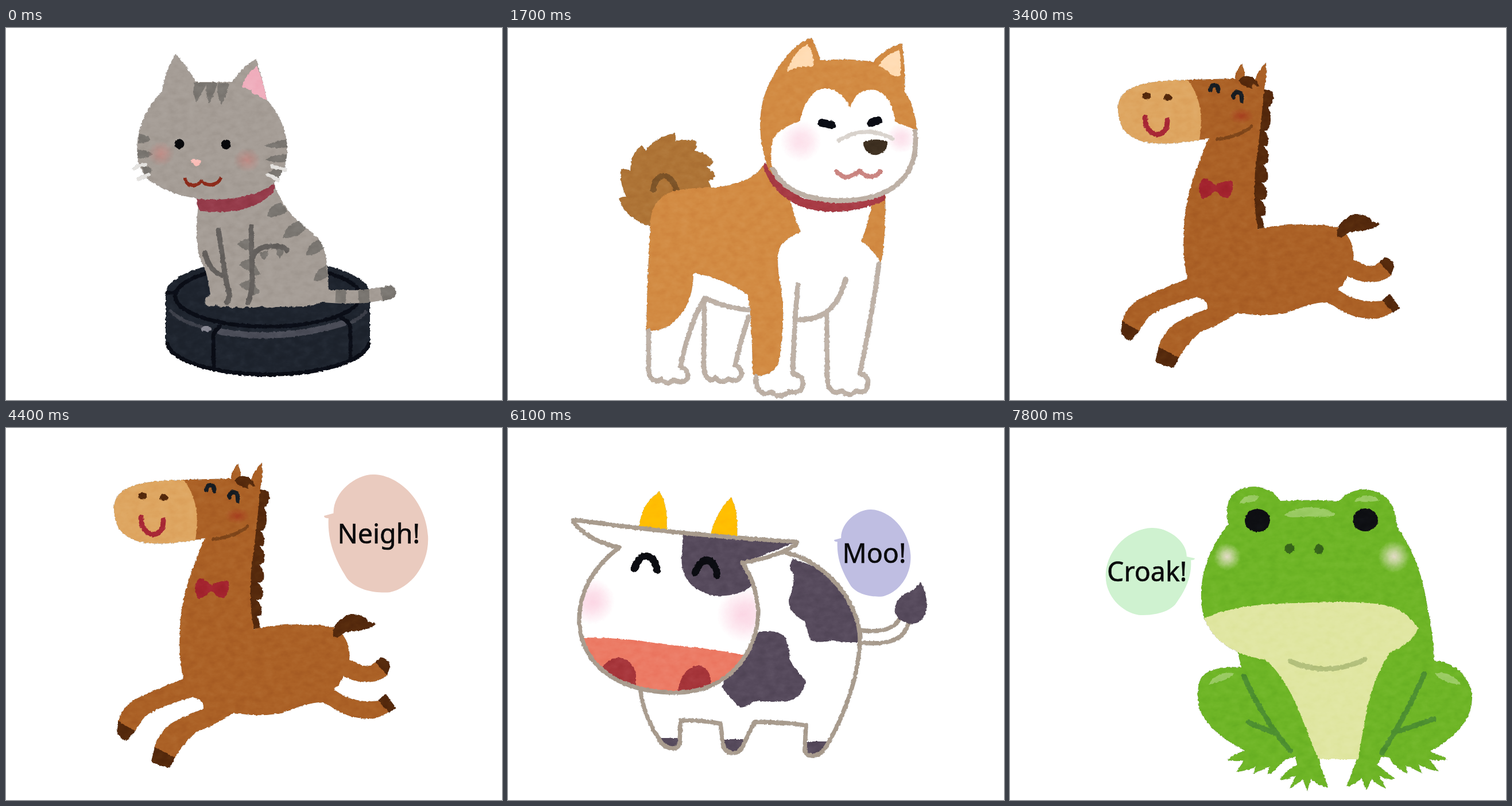
Animation of 864x648 px, one loop 8000 ms. Source, as an HTML page:

```html
<!DOCTYPE html>
<html lang="en">
<head>
<meta charset="utf-8">
<title>Animal sounds</title>
<style>
html,body{margin:0;width:100%;height:100%;overflow:hidden;background:#fff}
svg{display:block;width:100vw;height:100vh}
.art{filter:url(#paper)}
.l{fill:none;stroke-linecap:round;stroke-linejoin:round}
text{font:46.5px "Noto Sans","Open Sans",sans-serif;fill:#0a0a0c;stroke:#0a0a0c;stroke-width:.6}
</style>
</head>
<body>
<svg viewBox="0 0 864 648">
<defs>
  <filter id="paper" filterUnits="userSpaceOnUse" x="0" y="0" width="864" height="648" color-interpolation-filters="sRGB">
    <feTurbulence type="fractalNoise" baseFrequency=".2" numOctaves="2" seed="4" result="grain"/>
    <feDisplacementMap in="SourceGraphic" in2="grain" scale="4" xChannelSelector="R" yChannelSelector="G" result="rough"/>
    <feTurbulence type="fractalNoise" baseFrequency=".06 .09" numOctaves="4" seed="9"/>
    <feColorMatrix values=".16 0 0 0 .42  .16 0 0 0 .42  .16 0 0 0 .42  0 0 0 0 1" result="mottle"/>
    <feBlend in="mottle" in2="rough" mode="soft-light"/>
    <feComposite in2="rough" operator="in"/>
  </filter>
  <radialGradient id="catBlush"><stop offset="0" stop-color="#c4857f" stop-opacity=".8"/><stop offset="1" stop-color="#c4857f" stop-opacity="0"/></radialGradient>
  <radialGradient id="pink"><stop offset="0" stop-color="#fbd3e2"/><stop offset=".35" stop-color="#fbd3e2" stop-opacity=".8"/><stop offset="1" stop-color="#fbd3e2" stop-opacity="0"/></radialGradient>
  <radialGradient id="rust"><stop offset="0" stop-color="#a63a1e" stop-opacity=".85"/><stop offset="1" stop-color="#a63a1e" stop-opacity="0"/></radialGradient>
  <radialGradient id="pale"><stop offset="0" stop-color="#e3dbc6"/><stop offset=".35" stop-color="#dcdcbd" stop-opacity=".75"/><stop offset="1" stop-color="#d5dfb4" stop-opacity="0"/></radialGradient>
  <path id="bubble" d="M108 0C143-2 191 34 190 78L209 83Q209 88 200 88C203 144 178 184 163 209C143 234 103 239 78 237C38 229-2 184 1 124C5 54 58 2 108 0Z"/>
  <path id="cowHead" d="M194 208Q142 198 114 164Q110 159 122 161Q300 186 498 198Q508 199 500 204Q470 224 408 235Q432 268 436 318C436 385 390 461 290 461C200 460 130 420 124 340Q122 262 194 208Z"/>
  <clipPath id="cowClip"><use href="#cowHead"/></clipPath>
</defs>

<g class="scene">
  <g class="art">
    <path fill="#1e242e" d="M278 463A178 60 0 0 1 634 463V545A178 60 0 0 1 278 545Z"/>
    <g class="l" stroke="#3d404a" stroke-width="6">
      <path d="M287 493Q306 512 343 522M603 512Q619 504 627 494"/>
      <path stroke="#4b4d58" stroke-width="11" d="M373 529Q480 547 588 514"/>
    </g>
    <ellipse cx="349" cy="524" rx="9" ry="5" fill="#888893"/>
    <g class="l" stroke="#0a0d16" stroke-width="7">
      <ellipse cx="456" cy="467" rx="161" ry="53"/>
      <path d="M281 461H295M362 590L361 540Q361 526 373 520M600 577V522Q599 511 584 505M281 550A176 58 0 0 0 632 550"/>
    </g>
    <g class="l" stroke-width="23">
      <path stroke="#a59d96" d="M548 466C590 470 630 470 668 460"/>
      <g stroke="#7a7671" style="stroke-linecap:butt">
        <path d="M574 467L592 468M614 468L633 467M654 464L667 461"/>
      </g>
      <path stroke="#7a7671" d="M667 461L668 460"/>
    </g>
    <path fill="#a59d96" d="M336 305Q329 345 334 385Q337 403 347 420Q354 448 356 464Q343 470 348 483Q357 488 365 482Q375 489 384 484Q391 490 402 486Q410 490 420 485Q432 490 445 484Q458 490 470 486L520 485Q545 483 562 470Q562 400 551 378Q545 365 520 346Q485 320 466 270Z"/>
    <g fill="#7a7671">
      <path d="M455 328Q458 308 479 304L490 319Q474 332 455 328ZM482 366Q489 340 511 336L523 350Q507 367 482 366ZM522 396Q527 373 545 369L554 383Q541 396 522 396ZM536 440Q539 420 558 414L561 433Q549 442 536 440Z"/>
      <path d="M403 376Q413 366 427 366V388Q411 386 403 376ZM406 412Q415 403 427 402V424Q413 421 406 412ZM406 447Q416 440 427 439V459Q414 456 406 447ZM430 406L444 430L430 431ZM430 440L442 461L427 467ZM441 391Q443 400 450 404Q456 398 457 387ZM470 385Q472 396 477 401Q483 394 483 386Z"/>
    </g>
    <path class="l" stroke="#64605d" stroke-width="9" d="M427 346L429 442Q428 462 422 478M370 352C378 400 381 440 390 466L385 478M346 391Q355 425 377 431M430 399Q438 379 465 380Q482 380 490 387"/>
    <path fill="#953b4a" d="M332 294Q405 302 465 268Q469 277 466 286Q425 328 342 319Q331 316 332 294Z"/>
    <path fill="#a59d96" d="M272 110Q277 72 296 45Q317 69 331 94H394Q407 71 435 54Q446 84 454 124Q490 165 490 215Q488 256 458 277Q418 300 350 299Q284 293 248 264Q224 240 229 197Q236 146 272 110Z"/>
    <path fill="#f0aebd" d="M437 66Q449 94 454 124Q445 125 440 117Q430 118 427 109Q421 106 410 102Q418 81 437 66Z"/>
    <path fill="#7a7671" d="M328 95H350Q342 112 332 130Q324 112 328 95ZM349 95H368Q363 119 354 131Q346 112 349 95ZM369 96H388Q386 115 375 133Q366 115 369 96ZM232 184Q248 187 252 194Q246 201 230 201ZM229 212Q248 212 256 220Q245 228 229 226ZM235 240Q250 240 255 248Q250 256 243 256ZM489 194Q466 198 450 205Q465 211 489 208ZM489 219Q465 221 452 229Q465 236 488 233ZM486 242Q463 245 455 254Q466 262 474 264Z"/>
    <ellipse cx="270" cy="219" rx="23" ry="22" fill="url(#catBlush)"/>
    <ellipse cx="420" cy="230" rx="24" ry="21" fill="url(#catBlush)"/>
    <path class="l" stroke="#e4e2df" stroke-width="6" d="M223 245Q231 239 243 238M231 263L249 255M463 241L487 247M456 256Q466 258 474 265"/>
    <circle cx="302" cy="202" r="8.5" fill="#08090c"/><circle cx="383" cy="203" r="8.5" fill="#08090c"/>
    <path fill="#fabfb9" d="M322 230Q331 227 340 231Q339 240 331 241Q325 238 322 230Z"/>
    <path class="l" stroke="#8c2a1a" stroke-width="6" d="M312 263Q315 274 326 274Q335 273 341 267Q348 274 358 273Q370 271 373 263"/>
  </g>
  <g class="talk"><use href="#bubble" fill="#fff0bf" transform="translate(24 55) scale(.92)"/><text x="43" y="179">Meow!</text></g>
</g>

<g class="scene">
  <g class="art">
    <path fill="#ae7436" d="M254 347Q205 335 193 297Q199 293 206 294Q194 270 196 247Q204 244 213 248Q214 218 232 204Q237 207 239 214Q257 190 290 183Q294 190 291 197Q310 193 328 196Q330 205 326 214Q345 216 358 233Q354 241 346 242Q356 248 361 258Q356 265 348 267Q354 272 355 285L300 310Z"/>
    <path class="l" stroke="#7d5428" stroke-width="10" d="M253 282C256 250 285 248 294 285"/>
    <g fill="#d28b43">
      <path d="M447 236Q424 273 355 278Q295 278 275 290Q247 307 248 345Q242 440 241 526Q282 533 309 487Q323 463 323 427Q370 434 417 464Q425 500 426 604Q440 610 462 597Q474 588 475 555Q483 500 476 455Q466 405 473 383Q484 366 510 355Q495 320 490 290Z"/>
      <path d="M657 285Q660 350 650 412Q638 386 615 371Q630 338 635 295Z"/>
    </g>
    <path class="l" stroke="#beb1a6" stroke-width="8.5" d="M245 528L245 592Q245 615 262 615L267 612Q278 624 289 613Q305 621 313 610Q315 595 300 590Q318 510 343 470Q380 488 419 491M342 474L341 588Q341 612 356 613L361 609Q372 622 384 611Q401 620 407 603Q407 592 396 588Q401 560 419 503M432 607Q431 634 448 637L459 634Q473 648 490 633Q514 640 514 615Q509 604 496 602Q499 510 505 447M505 508Q571 510 588 437M555 498L556 606Q556 634 573 635L582 632Q594 645 606 632Q627 640 627 615Q625 604 613 602Q638 480 646 411"/>
    <path fill="#a83b45" d="M447 234L445 242Q460 290 510 311Q575 334 656 301L657 285Q570 314 510 295Z"/>
    <path fill="#d28b43" d="M453 245Q430 180 445 122Q460 78 487 47Q507 23 529 17Q539 35 544 57Q590 51 635 59Q656 36 686 26Q693 65 691 110Q708 135 713 178L640 275L500 285Q470 270 453 245Z"/>
    <path fill="#fff" d="M460 247Q456 215 462 193Q474 173 508 163Q517 122 540 108Q576 97 596 139Q607 103 640 108Q669 116 674 163L711 178C718 258 670 300 580 301C510 301 475 276 460 247Z"/>
    <path fill="#ffdcb4" d="M486 76Q498 40 522 28Q533 45 533 67Q508 64 486 76ZM646 65Q655 48 682 38Q686 60 683 83Q672 88 661 75Z"/>
    <circle cx="510" cy="197" r="36" fill="url(#pink)" opacity=".7"/><circle cx="685" cy="192" r="26" fill="url(#pink)" opacity=".7"/>
    <path class="l" stroke="#beb1a6" stroke-width="8.5" d="M709 180C717 258 670 300 580 301C510 300 476 276 461 245"/>
    <path class="l" stroke="#dad4ce" stroke-width="7" d="M576 196Q623 167 670 193"/>
    <path class="l" stroke="#0a0c14" stroke-width="14" d="M547 165L564 169M633 165L645 161"/>
    <path fill="#3d2f20" d="M619 199Q640 190 661 198Q662 208 653 216Q640 226 627 217Q618 209 619 199Z"/>
    <path class="l" stroke="#cb8682" stroke-width="8" d="M572 250Q585 265 600 257Q607 253 612 249Q624 261 637 258Q646 255 648 250"/>
  </g>
  <g class="talk"><use href="#bubble" fill="#ffbfbf" transform="translate(47 16)"/><text x="83" y="151">Woof!</text></g>
</g>

<g class="scene">
  <g class="art">
    <path fill="#55290c" d="M440 106Q460 106 459 122Q457 136 450 136Q457 160 452 172Q448 180 443 179Q453 190 449 203Q446 208 441 206Q453 215 450 232Q448 238 441 237Q452 250 449 264Q446 270 439 269Q450 282 447 295Q444 301 437 299Q448 312 445 325L438 328Q443 340 443 351L430 349L420 300Z"/>
    <path fill="#ab6126" d="M309 90L391 88Q395 70 404 62Q409 73 409 86L426 94Q431 73 446 60Q448 80 443 106Q436 180 427 250Q423 310 432 350Q470 342 510 342Q555 342 575 349Q602 370 598 404L610 408Q630 422 645 406L664 430Q652 442 630 443Q603 442 588 432Q582 448 571 455Q604 481 650 475L668 494Q646 507 632 507Q594 505 570 488Q558 479 546 478Q522 480 490 493Q450 506 397 496Q365 517 331 530Q312 545 294 575L258 557Q270 524 292 512Q320 497 344 489Q345 474 325 469Q262 486 241 504L224 529L195 512Q203 485 224 473Q265 453 309 437Q300 400 303 345Q305 285 346 193L330 195Z"/>
    <path fill="#55290c" d="M570 363Q566 337 600 324Q621 323 632 337L645 341Q632 353 605 354Q590 355 585 360Q578 367 570 363ZM196 511L225 528L210 545Q195 540 193 528ZM259 556L294 574L286 592Q262 588 253 580ZM643 408L653 399Q669 405 669 416L664 431ZM648 474L661 463L680 488L667 496ZM399 91Q405 80 420 85Q433 90 433 102L423 98L422 106Q409 102 402 97Z"/>
    <path fill="#dea661" d="M309 90C250 92 188 95 188 140C188 205 250 209 330 195Q341 130 309 90Z"/>
    <ellipse cx="238" cy="118" rx="8" ry="6.5" fill="#55290c"/><ellipse cx="275" cy="121" rx="7" ry="6" fill="#55290c"/>
    <ellipse cx="403" cy="153" rx="22" ry="14" fill="url(#rust)"/>
    <g class="l">
      <path stroke="#a82735" stroke-width="9" d="M235 156C236 194 275 194 274 161"/>
      <path stroke="#171c22" stroke-width="7.5" d="M349 108C349 96 365 97 363 110M389 121C389 108 406 108 404 127"/>
      <path stroke="#7e4519" stroke-width="6" d="M361 194Q400 189 421 171"/>
    </g>
    <path fill="#a3232e" d="M358 275Q346 262 337 262Q329 268 329 280Q330 296 337 297Q347 294 358 284Q372 298 380 296Q389 288 389 270Q386 262 372 268Q362 271 358 275Z"/>
  </g>
  <g class="talk"><use href="#bubble" fill="#eacbbf" transform="translate(736 81) scale(-.871 .866)"/><text x="577.5" y="201">Neigh!</text></g>
</g>

<g class="scene">
  <g class="art">
    <path class="l" stroke="#a99c8e" stroke-width="7.5" d="M613 352Q665 360 682 333M613 374Q682 380 693 350Q698 343 698 335"/>
    <path fill="#564a5c" d="M719 268Q730 290 730 312Q725 340 705 341Q680 340 673 318Q675 295 700 285Q712 279 719 268Z"/>
    <path fill="#564a5c" d="M496 228Q560 245 588 290Q612 335 610 373Q585 374 566 370Q540 376 526 369Q520 345 515 336Q488 320 489 300Q500 270 497 255Q487 240 496 228ZM437 355Q470 350 483 365Q493 392 490 402Q500 420 519 440Q515 468 490 475Q460 479 430 475Q415 487 405 487Q385 470 372 450L400 400ZM263 540H298Q299 558 285 558Q270 556 263 540ZM374 542H411Q406 566 390 566Q376 565 374 542ZM519 546H558Q547 571 530 571Q516 570 519 546Z"/>
    <path class="l" stroke="#a99c8e" stroke-width="7.5" d="M480 216C560 233 614 310 613 370C611 440 580 510 560 545Q547 571 530 571Q515 570 517 558L519 518Q480 512 430 512Q418 535 411 550Q405 567 390 566Q375 565 374 545L370 515Q340 509 301 509L299 545Q299 559 285 558Q270 556 262 540Q236 500 231 458"/>
    <path fill="#ffbe02" d="M227 178Q232 130 264 111Q280 135 276 184ZM351 191Q365 140 389 121Q402 145 399 194Z"/>
    <use href="#cowHead" fill="#fff"/>
    <g clip-path="url(#cowClip)">
      <circle cx="146" cy="302" r="40" fill="url(#pink)" opacity=".9"/><circle cx="412" cy="325" r="48" fill="url(#pink)" opacity=".9"/>
      <path fill="#564a5c" d="M305 184L510 196L408 236Q419 250 424 275Q400 295 360 292Q296 280 303 215Z"/>
      <path fill="#ec7b65" d="M120 365Q205 364 270 377Q345 382 420 397L400 470H130Z"/>
      <path fill="#a6353a" d="M160 422Q175 400 195 400Q218 405 223 430V455H170ZM295 465Q300 418 332 413Q352 418 353 440V465Z"/>
    </g>
    <use href="#cowHead" class="l" stroke="#a99c8e" stroke-width="7.5"/>
    <path class="l" stroke="#0b0c11" stroke-width="12.5" d="M220 245C230 215 253 215 260 248M326 252C336 222 359 222 364 256"/>
  </g>
  <g class="talk"><use href="#bubble" fill="#bfbee2" transform="translate(702 142) scale(-.641 .639)"/><text x="582.5" y="235">Moo!</text></g>
</g>

<g class="scene">
  <g class="art">
    <path fill="#6eb526" d="M380 168Q372 125 395 110Q430 92 460 114L471 127Q520 124 574 127Q590 107 620 107Q655 110 668 140L676 175Q715 230 727 310Q739 370 739 405Q795 412 805 465Q808 522 732 563L763 577Q745 581 730 577L747 598Q725 595 712 586L717 601L690 588L692 602Q670 592 660 574L647 572L640 587L671 611Q655 613 643 606L655 628Q637 621 630 612L621 632L612 610Q600 622 586 625L600 588L606 570H538L541 588L554 626Q535 622 524 612L518 632L510 613L487 628L498 605Q485 612 470 613Q480 597 500 586L496 573Q480 576 470 586Q462 600 448 603L453 590L424 602L428 590Q412 598 394 599L408 579Q393 582 377 578Q390 568 409 562Q346 530 330 490Q322 445 337 430Q360 413 403 417L396 388L338 333C322 268 345 212 380 168Z"/>
    <path fill="#e0e6a2" d="M338 331Q400 305 500 305Q600 300 650 308Q690 315 711 349Q700 375 662 391Q630 440 620 500L606 577H538C512 525 498 452 446 404Q420 400 396 390Q352 370 338 331Z"/>
    <circle cx="378" cy="224" r="24" fill="url(#pale)"/><circle cx="669" cy="224" r="28" fill="url(#pale)"/>
    <path fill="#9bcb64" d="M400 131Q410 112 433 119Q434 130 400 131ZM599 127Q620 108 645 126Q622 131 599 127ZM478 151Q520 126 567 149Q568 157 520 154Q480 158 478 151ZM346 447Q358 423 390 427Q386 438 346 447ZM740 427Q768 422 786 447Q752 445 740 427Z"/>
    <g class="l" stroke="#4d8f30" stroke-width="9">
      <path d="M407 432Q443 510 488 562M415 513L460 531M722 428Q690 500 648 566M738 507L668 531"/>
      <path stroke="#b3c07c" d="M488 406Q550 435 618 403"/>
    </g>
    <g fill="#0e0f13"><ellipse cx="431" cy="161" rx="22" ry="20"/><ellipse cx="619" cy="160" rx="22" ry="20"/></g>
    <g fill="#38651b"><circle cx="487" cy="210" r="8.5"/><circle cx="538" cy="211" r="8.5"/></g>
  </g>
  <g class="talk"><use href="#bubble" fill="#cff2d0" transform="translate(166 174) scale(.746 .64)"/><text x="169" y="267">Croak!</text></g>
</g>
</svg>
<script>
const LOOP = 8000, SCENE = 1700, QUIET = 1000;
const scenes = [...document.querySelectorAll('.scene')];
const talks = [...document.querySelectorAll('.talk')];
const show = (el, on) => { el.style.display = on ? '' : 'none'; };

function draw(ms) {
  const t = ms % LOOP;
  const now = Math.floor(t / SCENE);
  scenes.forEach((s, i) => show(s, i === now));
  talks.forEach(b => show(b, t % SCENE >= QUIET));
}

const start = performance.now();
function tick() {
  draw(performance.now() - start);
  requestAnimationFrame(tick);
}
tick();
</script>
</body>
</html>
```
